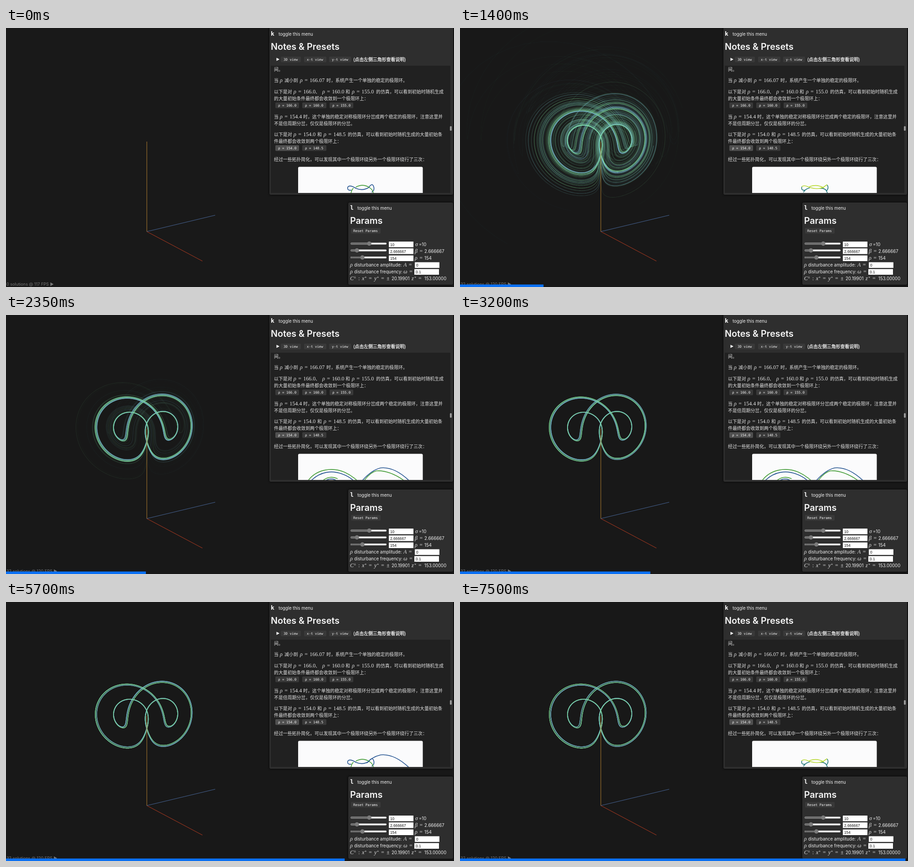
Animation of 983 by 570 pixels, one loop 7550 ms. Source, as an HTML page with a canvas:

```html
<!DOCTYPE html>
<html lang="zh">
<head>
<meta charset="utf-8">
<title>Lorenz limit cycles</title>
<style>
  html, body { margin: 0; width: 100%; height: 100%; overflow: hidden; background: #191919; }
  canvas, svg { position: absolute; left: 0; top: 0; display: block; }
  text { fill: #e4e4e4; font: 9.9px "Noto Sans CJK SC", "Noto Sans CJK JP", sans-serif; white-space: pre; }
  .latin { font: 9.65px Inter, sans-serif; fill: #f0f0f0; }
  .head { font: 600 19.7px Inter, sans-serif; fill: #f6f6f6; }
  .white { fill: #fff; stroke: #fff; stroke-width: 0.25; }
  .key { font: bold 13px "DejaVu Sans Mono", monospace; fill: #fff; }
  .mono { font: 7.45px "DejaVu Sans Mono", monospace; fill: #f6f6f6; }
  .math { font: 12px "Liberation Serif", serif; word-spacing: 1.4px; }
  .var { font-style: italic; }
  .sup { font: 8px "Liberation Serif", serif; }
  .field { font: 8.3px "Liberation Sans", sans-serif; fill: #111; }
  .count { font: 9.1px Inter, sans-serif; fill: #777; }
  .panel { fill: #2e2e2e; filter: drop-shadow(0 0 2px #000); }
</style>
</head>
<body>
<canvas id="plot" width="983" height="570"></canvas>
<svg id="ui" width="983" height="570" viewBox="0 0 983 570">
  <defs><clipPath id="notes"><rect x="581" y="83" width="394" height="280"/></clipPath></defs>
  <g id="axes" stroke-width="1.1"></g>
  <rect class="panel" x="578" y="-5" width="403" height="372" rx="3"/>
  <rect class="panel" x="751" y="384" width="230" height="181" rx="3"/>
  <rect x="581" y="83" width="394" height="280" fill="#212121"/>
  <rect x="974" y="216" width="4" height="10" rx="1.5" fill="#999"/>
  <path d="M593.5 65.5v7l6.5 -3.5z" fill="#fff"/>
  <g id="controls"></g>
  <g clip-path="url(#notes)">
    <rect x="641" y="305.500" width="273.500" height="120" rx="3" fill="#fbfbfc"/>
    <g id="sketch" fill="none" stroke-width="1.6" stroke-linecap="round"></g>
  </g>
  <text id="count" class="count" x="1" y="566.500"></text>
  <rect id="bar" y="564.500" height="5.500" fill="#0a70f4"/>
</svg>
<script>
const LOOP = 7550, FRAME = 50, BG = '#191919';
const $ = id => document.getElementById(id);

// ---------- panels ----------
let markup = '';
const text = (x, y, s, cls = '') => markup += `<text x="${x}" y="${y}" class="${cls}">${s}</text>`;
const latin = (x, y, s) => text(x, y, s, 'latin');
const rect = (x, y, w, h, fill, rx = 2) =>
  markup += `<rect x="${x}" y="${y}" width="${w}" height="${h}" rx="${rx}" fill="${fill}"/>`;
const math = (x, y, name, value = '') =>
  text(x, y, `<tspan class="var">${name}</tspan>${value && ' = ' + value}`, 'math');
const button = (x, y, w, label, pad = 6, fill = '#393939') => {
  rect(x, y - 6, w, 12.5, fill);
  text(x + pad, y + 2.8, label, 'mono');
};
const field = (x, y, value) => {
  rect(x, y, 54, 12.5, '#fff', 0.5);
  text(x + 3, y + 9.5, value, 'field');
};
const slider = (y, knob) => {
  rect(756, y - 2, 79, 4, '#efefef');
  rect(756, y - 2, knob - 756, 4, '#6c6c6c');
  rect(knob - 4.7, y - 4.7, 9.4, 9.4, '#7b7b7b', 4.7);
};

text(581, 17, 'k', 'key');
latin(598, 16.5, 'toggle this menu');
text(581, 48, 'Notes &amp; Presets', 'head');
button(603, 69, 44, '3D view');
button(654, 69, 49, 'x-t view');
button(709, 69, 48, 'y-t view');
text(762, 72.5, '(点击左侧三角形查看说明)', 'white');

text(588, 95, '间。');
text(588, 119, '当');
math(601, 119, 'ρ');
text(611, 119, '减小到');
math(645, 119, 'ρ', '166.07');
text(703, 119, '时，系统产生一个单独的稳定的极限环。');
text(588, 144, '以下是对');
math(631, 144, 'ρ', '166.0');
text(679, 144, '、');
math(694, 144, 'ρ', '160.0');
text(745, 144, '和');
math(759, 144, 'ρ', '155.0');
text(812, 144, '的仿真，可以看到初始时随机生成');
text(588, 158.5, '的大量初始条件最终都会收敛到一个极限环上：');
button(591, 170, 52, 'ρ = 166.0');
button(650, 170, 53, 'ρ = 160.0');
button(710, 170, 52, 'ρ = 155.0');
text(588, 199, '当');
math(601, 199, 'ρ', '154.4');
text(652, 199, '时，这个单独的稳定对称极限环分岔成两个稳定的极限环，注意这里并');
text(588, 213.5, '不是倍周期分岔，仅仅是极限环的分岔。');
text(588, 237.5, '以下是对');
math(631, 237.5, 'ρ', '154.0');
text(683, 237.5, '和');
math(697, 237.5, 'ρ', '148.5');
text(750, 237.5, '的仿真，可以看到初始时随机生成的大量初始条');
text(588, 252.5, '件最终都会收敛到两个极限环上：');
button(591, 264, 52, 'ρ = 154.0', 6, '#505050');
button(650, 264, 53, 'ρ = 148.5');
text(588, 292.5, '经过一些拓扑简化，可以发现其中一个极限环绕另外一个极限环绕行了三次：');

text(755, 400, 'l', 'key');
latin(771, 399.5, 'toggle this menu');
text(755, 431, 'Params', 'head');
button(757, 446, 65, 'Reset Params', 5);
slider(474.5, 797);
slider(489.5, 770);
slider(505, 782);
field(840, 470, '10');
field(840, 485, '2.666667');
field(840, 500.5, '154');
math(898, 479.5, 'σ');
latin(906, 479.5, '=10');
math(897, 494.5, 'β', ' ');
latin(918, 494.5, '2.666667');
math(897, 510, 'ρ', ' ');
latin(918, 510, '154');
math(755, 525, 'ρ');
latin(764, 525, 'disturbance amplitude:');
math(872, 525, 'A', ' ');
field(897, 515.5, '0');
math(755, 540, 'ρ');
latin(764, 540, 'disturbance frequency:');
math(872, 540, 'ω', ' ');
field(896, 530.5, '0.1');
math(755, 555, 'C');
text(763.5, 550.5, '±', 'sup');
text(773, 555, ':', 'math');
for (const [x, name] of [[781, 'x'], [808, 'y'], [890, 'z']]) {
  math(x, 555, name);
  text(x + 6, 553, '*', 'sup');
  text(x + 15, 555, '=', 'math');
}
text(835, 555, '±', 'math');
latin(846, 555, '20.19901');
latin(918, 555, '153.00000');
$('controls').innerHTML = markup;

// ---------- sketch on the white card ----------
const BLUE = '#20508f', GREEN = '#459d38', LIME = '#b8d935', TEAL = '#1f7479';
const stroke = (color, d) => `<path stroke="${color}" d="${d}"/>`;
const knot =
  stroke(BLUE, 'M757 357Q748 358 750 350Q754 344 768 353Q783 359 796 351Q804 339 807 350Q809 357 803 361') +
  stroke(GREEN, 'M768 350Q785 341 800 353Q805 357 806 364M757 364Q758 356 762 353');
const brightKnot =
  stroke(TEAL, 'M757 357Q748 358 750 350M754 361Q758 354 767 352M790 353Q800 352 804 358L806 363M806 346Q810 352 804 359') +
  stroke(LIME, 'M750 349Q755 345 765 350Q785 357 798 350L805 345M767 349Q784 343 798 352');
const leftArch = stroke(BLUE, 'M671 363C690 345 715 341 738 350Q752 355 762 364');
const rightArch = 'Q803 341 822 336.500C845 334 866 347 884 364';
const fullCurves = leftArch +
  stroke(GREEN, 'M664 363C682 340 715 334 743 346Q758 353 770 364M697 363Q711 353 727 360M787 363Q800 346 813 343C832 342 853 350 873 364') +
  stroke(BLUE, 'M700 365Q711 358 723 363M783 363' + rightArch);
const reduced = leftArch + stroke(BLUE, 'M787 363' + rightArch) +
  stroke(GREEN, 'M783 364Q790 355 806 363');
const oneArch = knot + stroke(BLUE, 'M792 354' + rightArch);
const scenes = [[0, knot], [600, brightKnot], [1750, fullCurves], [3300, reduced],
  [5000, oneArch], [6150, knot], [7200, brightKnot]];

// ---------- Lorenz system ----------
const SIGMA = 10, BETA = 8 / 3, RHO = 154, DT = 0.002;
const START = 790, SPEED = 0.005;   // simulated time per ms

function integrate(p) {
  const { x, y, z } = p;
  let u = x, v = y, w = z, sx = 0, sy = 0, sz = 0;
  for (let i = 0; i < 4; i++) {
    const a = SIGMA * (v - u), b = u * (RHO - w) - v, c = u * v - BETA * w;
    const weight = i === 1 || i === 2 ? 2 : 1, h = i === 2 ? DT : DT / 2;
    sx += weight * a; sy += weight * b; sz += weight * c;
    u = x + h * a; v = y + h * b; w = z + h * c;
  }
  p.x = x + DT / 6 * sx; p.y = y + DT / 6 * sy; p.z = z + DT / 6 * sz;
}
function run(p, time) {
  for (let i = Math.round(time / DT); i > 0; i--) integrate(p);
  return p;
}

let seed = 20;
const random = () => (seed = seed * 16807 % 2147483647) / 2147483647;
const spread = r => (random() * 2 - 1) * r;
const seeds = Array.from({ length: 32 }, () => {
  const start = { x: spread(60), y: spread(165), z: random() * 200 };
  // The colour family follows the cycle that the solution settles on.
  const p = run({ ...start }, 64);
  let high = 0, low = 0;
  for (let i = 0; i < 2.5 / DT; i++) {
    integrate(p);
    high = Math.max(high, p.y);
    low = Math.min(low, p.y);
  }
  const teal = high + low > 0;
  const hue = teal ? 164 + random() * 52 : 122 + random() * 42;
  return { start, teal, color: `hsl(${hue},58%,69%)` };
}).sort((a, b) => b.teal - a.teal);

// ---------- camera: axis tips are fixed, units and perspective are fitted ----------
const ORIGIN = [309, 448], TIP_X = [122, 65], TIP_Y = [150, -36], TIP_Z = -198;
function project(cam, x, y, z) {
  const [ux, uy, uz, px, py, pz] = cam;
  const X = x / ux, Y = y / uy, Z = z / uz;
  const w = Math.max(0.3, 1 + px * X + py * Y + pz * Z);
  const a = (1 + px) * X, b = (1 + py) * Y, c = (1 + pz) * Z;
  return [ORIGIN[0] + (TIP_X[0] * a + TIP_Y[0] * b) / w,
    ORIGIN[1] + (TIP_X[1] * a + TIP_Y[1] * b + TIP_Z * c) / w];
}

function fitCamera() {
  const cycle = [], p = run({ x: 20, y: 60, z: 120 }, 160);
  for (let i = 0; i < 320; i++) {
    run(p, 0.008);
    cycle.push([p.x, p.y, p.z], [-p.x, -p.y, p.z]);
  }
  const marks = [[196, 246], [407, 245], [261, 184], [341, 176], [267, 319], [345, 317],
    [258, 275], [355, 275], [235.5, 246], [377, 246], [268, 215], [345, 213], [309, 278]];
  const guess = [150, 150, 150, -0.11, 0.075, -0.05];
  const scale = [12, 12, 12, 0.03, 0.03, 0.03];
  const loss = cam => {
    const pts = cycle.map(q => project(cam, ...q));
    const xs = pts.map(q => q[0]), ys = pts.map(q => q[1]);
    let sum = 3 * ((Math.min(...xs) - 195) ** 2 + (Math.max(...xs) - 408) ** 2 +
      (Math.min(...ys) - 174.5) ** 2 + (Math.max(...ys) - 320.5) ** 2);
    for (const [mx, my] of marks)
      sum += Math.min(...pts.map(q => (q[0] - mx) ** 2 + (q[1] - my) ** 2));
    cam.forEach((v, i) => sum += 0.5 * ((v - guess[i]) / scale[i]) ** 2);
    return sum;
  };
  let best = guess, error = loss(best);
  for (let size = 1, round = 0; size > 0.01 && round < 120; round++) {
    let better = false;
    for (let i = 0; i < 6; i++) for (const sign of [-1, 1]) {
      const trial = best.slice();
      trial[i] += sign * size * scale[i];
      const e = loss(trial);
      if (e < error) { best = trial; error = e; better = true; }
    }
    if (!better) size /= 2;
  }
  return best;
}
const camera = fitCamera();

// ---------- plot ----------
const axis = (color, dx, dy) => stroke(color, `M${ORIGIN}l${dx} ${dy}`);
$('axes').innerHTML = axis('#a87830', 0, TIP_Z) + axis('#98351f', ...TIP_X) + axis('#45618f', ...TIP_Y);

const ctx = $('plot').getContext('2d');
let frame, drawn, solutions;

function cover(alpha) {
  ctx.globalAlpha = alpha;
  ctx.fillStyle = BG;
  ctx.fillRect(0, 0, 983, 570);
}
function reset() {
  frame = drawn = 0;
  solutions = seeds.map(s => ({ ...s.start, color: s.color }));
  cover(1);
}
function advance() {
  frame++;
  const time = (frame * FRAME - START) * SPEED;
  const total = Math.max(0, Math.round(time / DT));
  if (!total) return;
  cover(0.14);
  ctx.globalAlpha = Math.min(0.06 + 0.45 * time, Math.max(0.2, 0.45 * Math.exp(-time / 12)));
  ctx.lineWidth = 1.1;
  ctx.lineJoin = 'round';
  for (const p of solutions) {
    ctx.strokeStyle = p.color;
    ctx.beginPath();
    ctx.moveTo(...project(camera, p.x, p.y, p.z));
    for (let i = drawn; i < total; i++) {
      integrate(p);
      ctx.lineTo(...project(camera, p.x, p.y, p.z));
    }
    ctx.stroke();
  }
  drawn = total;
}

let shownScene;
function render(t) {
  const target = Math.floor(t / FRAME);
  if (target < frame) reset();
  while (frame < target) advance();
  const now = target * FRAME;
  const scene = scenes.filter(s => s[0] <= now).pop();
  if (scene !== shownScene) $('sketch').innerHTML = (shownScene = scene)[1];
  $('bar').setAttribute('width', now ? now * 983 / LOOP + 1 : 0);
  $('count').textContent = now < 800 ? '0 solutions @ 117 FPS ▶' : '32 solutions @ 120 FPS ▶';
}

reset();
render(0);
const begin = performance.now();
function tick() {
  render((performance.now() - begin) % LOOP);
  requestAnimationFrame(tick);
}
requestAnimationFrame(tick);
</script>
</body>
</html>
```
